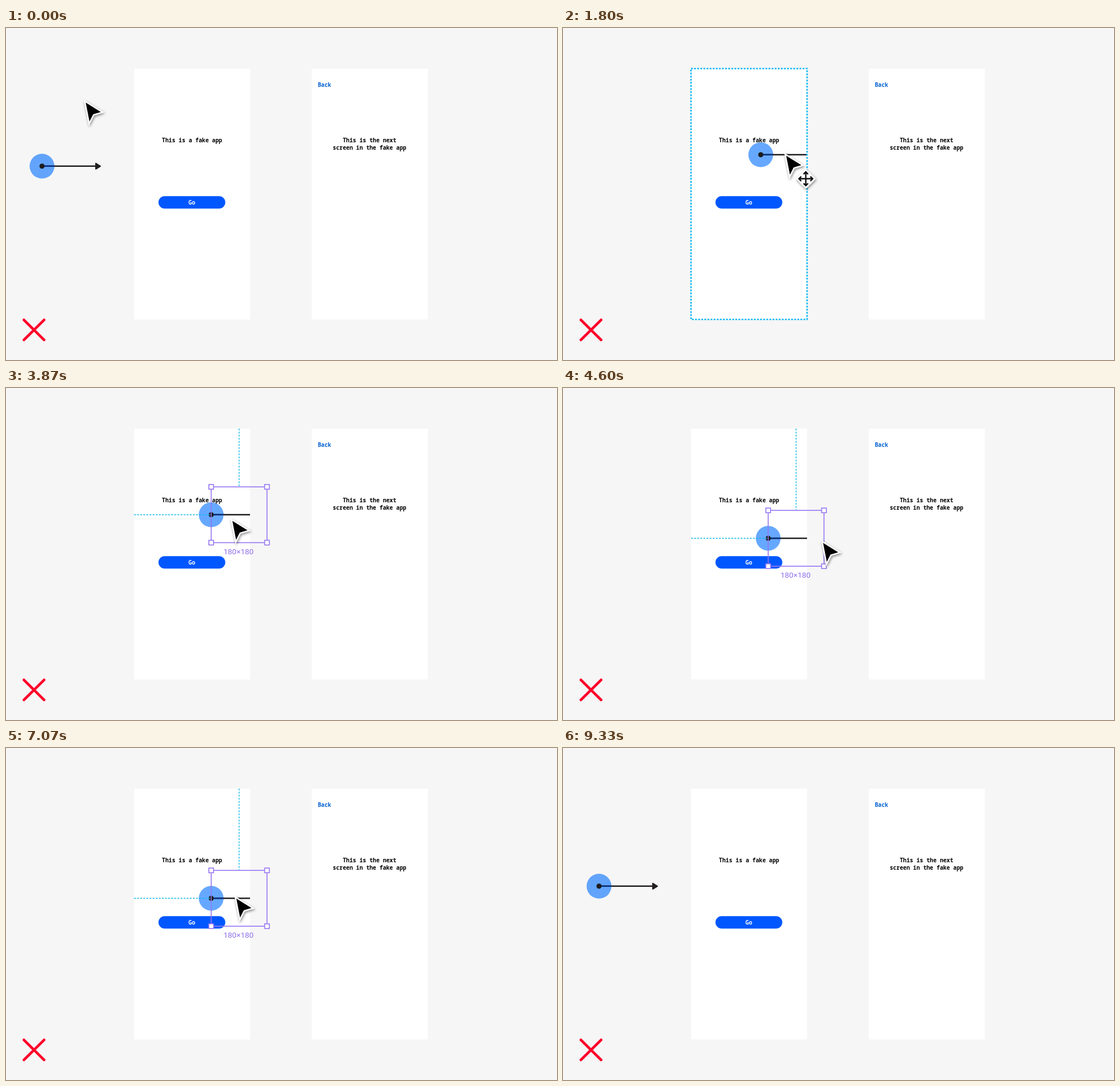
These frames come from a looping animation (964 px wide and 581 px high, 9.6 s). An HTML page:

```html
<!DOCTYPE html>
<html lang="en">
<head>
<meta charset="utf-8">
<title>Dragging an arrow between screens</title>
<style>
  html, body { margin: 0; width: 100%; height: 100%; overflow: hidden; background: #f6f6f6; }
  svg { display: block; width: 964px; height: 581px; }
  .mono { font: 700 9.75px "Noto Sans Mono", monospace; text-anchor: middle; }
  .size { font: 400 13.5px Roboto, sans-serif; text-anchor: middle; fill: #8e70ee; }
  .guide { fill: none; stroke: #12b9e8; stroke-width: 1.4; stroke-dasharray: 3.25 2.17; }
  .target { fill: none; stroke: #14b8f5; stroke-width: 2.6; stroke-dasharray: 3.25 2.17; }
  .box { fill: none; stroke: #9677f2; stroke-width: 1.6; }
  .handle { fill: #fff; stroke: #9677f2; stroke-width: 1.6; }
  .shadow { filter: drop-shadow(1px 2px 2px rgba(0, 0, 0, .45)); }
  .outline { fill: none; stroke: #fff; stroke-width: 7; stroke-linejoin: round; }
  .ink { fill: none; stroke: #111; stroke-width: 2.4; }
</style>
</head>
<body>
<svg viewBox="0 0 964 581">
  <defs>
    <clipPath id="screenClip"><rect x="224" y="71" width="203" height="439"/></clipPath>
    <path id="widthArrows" d="M-19 0H19M-13-6L-19 0L-13 6M13-6L19 0L13 6"/>
    <path id="moveArrows" d="M-12 0H12M0-12V12M-8-4L-12 0L-8 4M8-4L12 0L8 4M-4-8L0-12L4-8M-4 8L0 12L4 8"/>
  </defs>

  <rect width="964" height="581" fill="#f6f6f6"/>
  <path d="M31.3 510.8L66.7 545.8M66.7 510.8L31.3 545.8" stroke="#ff0028" stroke-width="4.6" stroke-linecap="round"/>

  <g fill="#fff">
    <rect x="224" y="71" width="203" height="439"/>
    <rect x="535" y="71" width="203" height="439"/>
  </g>
  <rect x="266.7" y="294.2" width="117" height="21.8" rx="10.9" fill="#0057ff"/>
  <g class="mono">
    <text x="325.5" y="200">This is a fake app</text>
    <text x="325.2" y="309" fill="#fff" style="font-weight:600">Go</text>
    <text x="557.2" y="103" fill="#0060cf">Back</text>
    <text x="636" y="200">This is the next</text>
    <text x="636" y="213">screen in the fake app</text>
  </g>

  <g id="arrowClip">
    <g id="arrow">
      <circle r="21.7" fill="#006eff" fill-opacity=".6"/>
      <path id="shaft" stroke="#221f20" stroke-width="2.4"/>
      <path d="M4 0H21.5" stroke="#08307f" stroke-width="2.4"/>
      <circle r="4.5" fill="#1e1c1e"/>
      <path id="head" d="M-9-5L-1 0L-9 5Z" fill="#221f20" stroke="#221f20" stroke-width="2" stroke-linejoin="round"/>
    </g>
  </g>

  <rect id="target" class="target"/>
  <g id="selection">
    <path id="guides" class="guide"/>
    <rect id="box" class="box"/>
    <g id="handles"></g>
    <text id="label" class="size"></text>
  </g>

  <g id="cursor">
    <g id="pointer" class="shadow">
      <path d="M2.5 3.5L29 20L15.5 24L9 36.8Z" stroke="#fff" stroke-width="5" paint-order="stroke"/>
    </g>
    <g id="moveBadge" class="shadow" transform="translate(36.8 43.8)">
      <path d="M0-15L15 0L0 15L-15 0Z" fill="#fff" stroke="#fff" stroke-width="4" stroke-linejoin="round"/>
      <use href="#moveArrows" class="ink"/>
    </g>
    <g id="resizer" class="shadow">
      <use href="#widthArrows" class="outline"/>
      <use href="#widthArrows" class="ink"/>
    </g>
  </g>
</svg>

<script>
const LOOP = 9600, STEP = 200 / 3, SIZE = 180, SIDE = 97.6, UNIT = SIDE / SIZE;
const SCREEN = { x: 224, y: 71, w: 203, h: 439 };
const CANVAS = { x: 1.5, y: 2, w: 961, h: 577.5 };

// The story is a chain of beats; each one lasts until its end time.
// The cursor glides to a new spot if there is one; a drag carries the arrow along.
const beats = [];
let last = { end: 0, to: [137, 127], arrowTo: [63, 241.8] };

function beat(mode, end, ...spot) {
  const from = last.to, arrow = last.arrowTo;
  const to = spot.length ? spot : from;
  const arrowTo = mode === "drag" ? arrow.map((v, i) => v + to[i] - from[i]) : arrow;
  last = { mode, start: last.end, end, from, to, arrow, arrowTo };
  beats.push(last);
}

// pick the arrow up and drop it on the first screen
beat("idle", 660, 105, 240);
beat("select", 860);
beat("drag", 1800, 388, 220);
beat("drag", 2600, 401, 220);
beat("select", 3330);
// move it down
beat("select", 3880, 393.5, 229);
beat("drag", 4300, 393.5, 270.2);
// pull the right edge, then let it snap back
beat("select", 4600, 452.5, 267.5);
beat("select", 4870, 456.5, 278);
beat("hover", 5130);
beat("resize", 5700, 584.5, 278);
beat("resize", 5897);
beat("resize", 6066, 456.5, 278);
beat("hover", 6130);
// press it, let go, deselect
beat("select", 6530, 400.5, 260);
beat("select", 6800);
beat("press", 7060);
beat("select", 7600);
beat("idle", 7860);
beat("idle", 8000, 436, 65);
// bring it back to the canvas
beat("idle", 8390, 400.5, 260);
beat("drag", 8860, 104.5, 238.8);
beat("select", 9060);
beat("idle", 9325, 163, 40);
beat("gone", LOOP);

const el = Object.fromEntries([...document.querySelectorAll("[id]")].map(e => [e.id, e]));
const set = (node, attrs) => { for (const k in attrs) node.setAttribute(k, attrs[k]); };
const show = (node, on) => { node.style.display = on ? "" : "none"; };
const moveTo = (node, x, y) => set(node, { transform: `translate(${x} ${y})` });
const setRect = (node, r) => set(node, { x: r.x, y: r.y, width: r.w, height: r.h });
const ease = p => p * p * (3 - 2 * p);
const mix = (a, b, k) => a.map((v, i) => v + (b[i] - v) * k);

const handles = Array.from({ length: 4 }, () => {
  const node = document.createElementNS("http://www.w3.org/2000/svg", "rect");
  set(node, { class: "handle", width: 8.2, height: 8.2 });
  return el.handles.appendChild(node);
});

function stateAt(t) {
  const b = beats.find(b => t < b.end);
  const k = ease((t - b.start) / (b.end - b.start));
  return { mode: b.mode, cursor: mix(b.from, b.to, k), arrow: mix(b.arrow, b.arrowTo, k) };
}

// The dragged edge trails the cursor by one step.
function widthAt(t, mode) {
  if (mode !== "resize") return SIDE;
  const grip = beats.find(b => b.mode === "resize").from[0];
  return SIDE + stateAt(t - STEP).cursor[0] - grip;
}

function drawSelection(x, y, w, inScreen) {
  const top = y - SIDE / 2, mid = x + w / 2;
  const origin = inScreen ? SCREEN : { x: 0, y: 1 };
  setRect(el.box, { x, y: top, w, h: SIDE });
  handles.forEach((node, i) =>
    set(node, { x: x + (i % 2) * w - 4.1, y: top + (i >> 1) * SIDE - 4.1 }));
  set(el.guides, { d: `M${mid} ${origin.y}V${top - 1}M${origin.x} ${y}H${x - 2}` });
  set(el.label, { x: mid - 1, y: top + SIDE + 20 });
  el.label.textContent = `${Math.round(w / UNIT)}×${SIZE}`;
}

function render(t) {
  const { mode, cursor, arrow: [x, y] } = stateAt(t);
  const width = widthAt(t, mode);
  const dragging = mode === "drag", resizing = mode === "hover" || mode === "resize";
  const grabX = x + 44;
  const inScreen = grabX >= SCREEN.x && grabX <= SCREEN.x + SCREEN.w;

  moveTo(el.arrow, x, y);
  set(el.shaft, { d: `M0 0H${width - 3.5}` });
  moveTo(el.head, width + 5.5, 0);
  set(el.arrowClip, { "clip-path": inScreen ? "url(#screenClip)" : "none" });

  show(el.target, dragging || mode === "press");
  setRect(el.target, inScreen ? SCREEN : CANVAS);
  show(el.selection, mode === "select" || mode === "press" || resizing);
  drawSelection(x, y, width, inScreen);

  show(el.cursor, mode !== "gone");
  moveTo(el.cursor, ...cursor);
  show(el.pointer, !resizing);
  show(el.resizer, resizing);
  show(el.moveBadge, dragging);
}

const start = performance.now();
function tick() {
  const t = (performance.now() - start) % LOOP;
  render(Math.floor((t + 4) / STEP) * STEP % LOOP);
  requestAnimationFrame(tick);
}
tick();
</script>
</body>
</html>
```
